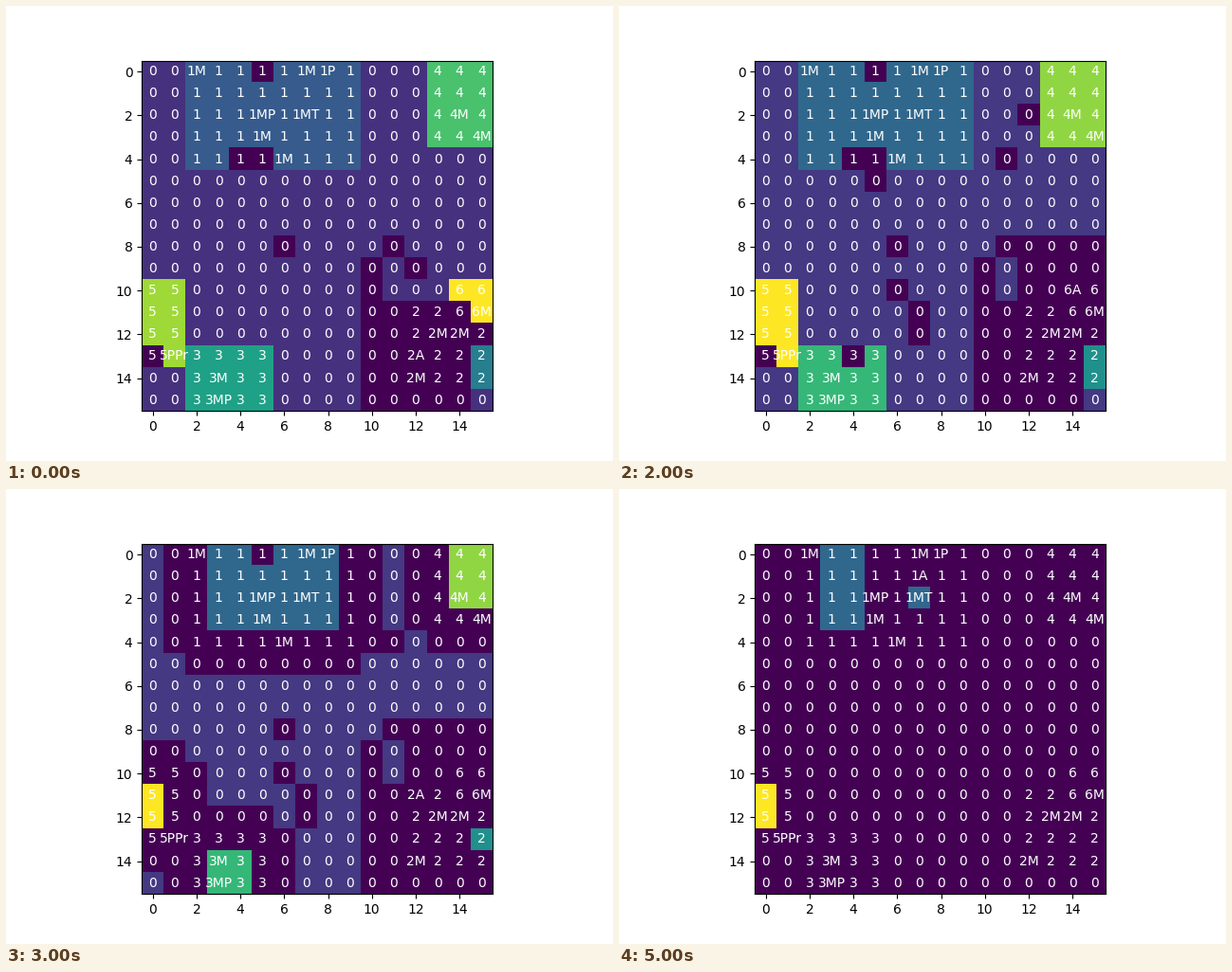
Recreate the animation shown at these times as a matplotlib script. Size 640 by 480 pixels, loop 6000 ms.

```python
import numpy as np
import matplotlib.pyplot as plt
from matplotlib.animation import FuncAnimation

N = 16
HIDDEN = -1
TREASURE = (2, 7)

rooms = np.zeros((N, N), int)
rooms[:5, 2:10] = 1
rooms[11:15, 12:] = 2
rooms[13:, 2:6] = 3
rooms[:4, 13:] = 4
rooms[10:14, :2] = 5
rooms[10:12, 14:] = 6

MARKS = {
    "M": [(0, 2), (0, 7), (2, 5), (2, 7), (2, 14), (3, 5), (3, 15), (4, 6),
          (11, 15), (12, 13), (12, 14), (14, 3), (14, 12), (15, 3)],
    "P": [(0, 8), (2, 5), (13, 1), (15, 3)],
    "T": [TREASURE],
    "Pr": [(13, 1)],
}

# Each turn: where the agent stands and how far it scans.
TURNS = [((13, 12), 2), ((10, 14), 0), ((10, 14), 2),
         ((11, 12), 0), ((1, 15), 2), ((1, 7), 2)]

row, col = np.indices((N, N))


def outside_scan(agent, reach):
    """Cells beyond the scanned square; the treasure itself always stays."""
    far = np.maximum(abs(row - agent[0]), abs(col - agent[1])) > reach
    far[TREASURE] = True
    return far


def not_at(*cells):
    keep = np.ones((N, N), bool)
    keep[tuple(zip(*cells))] = False
    return keep


def inner_cells():
    """Cells whose four neighbours all lie in the same room."""
    p = np.pad(rooms, 1, mode="edge")
    sides = p[:-2, 1:-1], p[2:, 1:-1], p[1:-1, :-2], p[1:-1, 2:]
    return np.all([side == rooms for side in sides], axis=0)


HINTS = {
    0: not_at((0, 5), (4, 4), (4, 5), (8, 6), (8, 11), (9, 10), (9, 12),
              (10, 10), (12, 15), (13, 0)),
    2: not_at((2, 12), (4, 11), (5, 5), (10, 6), (11, 7), (12, 7), (13, 4)),
    3: inner_cells(),
    4: np.isin(rooms, [1, 2, 5]),
    5: np.isin(rooms, [1, 5]),
}


def possible_cells(turn):
    """Combine the scans and hints of every turn so far."""
    mask = np.ones((N, N), bool)
    for t in range(turn + 1):
        mask &= outside_scan(*TURNS[t]) & HINTS.get(t, True)
    return mask


def cell_text(cell, agent):
    marks = "".join(m for m, cells in MARKS.items() if cell in cells)
    return f"{rooms[cell]}{marks}" + "A" * (cell == agent)


fig, ax = plt.subplots(figsize=(6.4, 4.8), dpi=100)
image = ax.imshow(rooms, cmap="viridis")
labels = {
    (r, c): ax.text(c, r, "", ha="center", va="center", color="w")
    for r, c in np.ndindex(N, N)
}


def draw(turn):
    beliefs = np.where(possible_cells(turn), rooms, HIDDEN)
    image.set_data(beliefs)
    image.set_clim(HIDDEN, beliefs.max())
    for cell, label in labels.items():
        label.set_text(cell_text(cell, TURNS[turn][0]))
    return [image, *labels.values()]


anim = FuncAnimation(fig, draw, frames=len(TURNS), interval=1000,
                     repeat=True, repeat_delay=0, blit=False)
plt.show()
```
